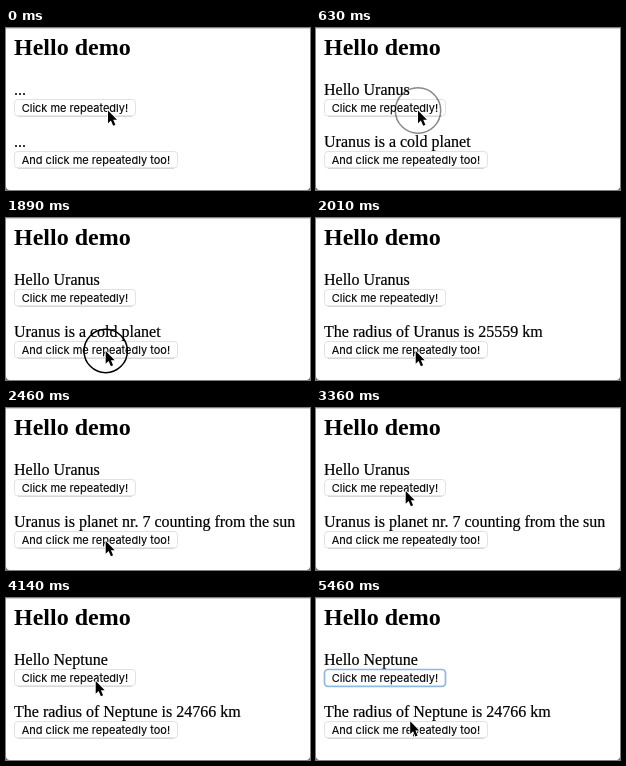
Recreate the animation shown at these times as an HTML page. Size 304x162 px, loop 5580 ms.

```html
<!DOCTYPE html>
<html lang="en">
<head>
<meta charset="utf-8">
<title>Hello demo</title>
<style>
  html, body { margin: 0; width: 100%; height: 100%; overflow: hidden; background: #fff; }
  svg { display: block; width: 100vw; height: 100vh; }
  text { fill: #000; white-space: pre; }
  .serif { font: 16px "Liberation Serif", serif; stroke: #000; stroke-width: .2px; }
  .title { font: bold 24px "Liberation Serif", serif; }
  .label { font: 11px Inter, sans-serif; stroke: #000; stroke-width: .12px; }
  .button { fill: #fff; stroke: #e2e2e2; }
  .shade { stroke: #c6c6c6; stroke-width: .8px; }
</style>
</head>
<body>
<svg viewBox="0 0 304 162" preserveAspectRatio="none">
  <rect width="304" height="162" fill="#fff"/>
  <path d="M0 .5H304" stroke="#d4d4d4"/>
  <path d="M0 159V162H3Q.5 161.500 0 159ZM304 159V162H301Q303.500 161.500 304 159Z" fill="#707070"/>
  <text class="title" x="8" y="27">Hello demo</text>
  <text class="serif" id="greeting" x="8" y="67"></text>
  <text class="serif" id="fact" x="8" y="119"></text>

  <rect class="button" x="8.500" y="71.500" width="121" height="16.500" rx="3.500"/>
  <path class="shade" d="M12 88.200H126"/>
  <rect id="focus" x="8.500" y="71.500" width="121" height="17" rx="3.500" fill="none" stroke="#8db9e4" stroke-width="1.700"/>
  <text class="label" x="15.700" y="84">Click me repeatedly!</text>

  <rect class="button" x="8.500" y="123.500" width="163" height="16.500" rx="3.500"/>
  <path class="shade" d="M12 140.200H168"/>
  <text class="label" x="15.700" y="136">And click me repeatedly too!</text>

  <circle id="ring" fill="none" stroke="#000" stroke-width="1.500"/>
  <path id="pointer" d="M0 0V12.700L2.900 10 5.200 15.300 7.400 14.300 5.200 9.300H9Z"
        stroke="#fff" stroke-width="1.600" stroke-linejoin="round" paint-order="stroke"/>
</svg>
<script>
const LOOP = 5580, STEP = 30;
const $ = id => document.getElementById(id);
const greeting = $("greeting"), fact = $("fact"), focus = $("focus");
const ring = $("ring"), pointer = $("pointer");

// time, greeting, fact
const lines = [
  [0, "...", "..."],
  [570, "Hello Uranus", "Uranus is a cold planet"],
  [1950, "Hello Uranus", "The radius of Uranus is 25559 km"],
  [2430, "Hello Uranus", "Uranus is planet nr. 7 counting from the sun"],
  [3510, "Hello Neptune", "Neptune is a cold planet"],
  [4110, "Hello Neptune", "The radius of Neptune is 24766 km"]
];

// time, x, y of the pointer tip
const path = [
  [0, 102, 82.5], [1320, 102, 82.5], [1620, 102, 144], [1800, 99.7, 133],
  [2910, 99.7, 133], [3090, 89.7, 88], [3210, 89.7, 88], [3360, 89.7, 83],
  [4620, 89.7, 83], [4800, 94.2, 123.3], [LOOP, 94.2, 123.3]
];

// ring appears, ring is gone
const clicks = [[450, 660], [1860, 2010], [2370, 2460], [3450, 3540], [4020, 4140]];

const ease = p => p * p * (3 - 2 * p);

function tipAt(t) {
  const i = path.findIndex(k => k[0] > t);
  const [t0, x0, y0] = path[i - 1], [t1, x1, y1] = path[i];
  const p = ease((t - t0) / (t1 - t0));
  return [x0 + (x1 - x0) * p, y0 + (y1 - y0) * p];
}

function draw(t) {
  const [, hello, info] = lines.filter(l => l[0] <= t).pop();
  if (greeting.textContent !== hello) greeting.textContent = hello;
  if (fact.textContent !== info) fact.textContent = info;

  const [x, y] = tipAt(t);
  pointer.setAttribute("transform", `translate(${x} ${y})`);

  const click = clicks.find(([a, b]) => t >= a && t < b);
  ring.style.display = click ? "" : "none";
  if (click) {
    const fade = Math.max(0, 1 - (click[1] - t) / 90);
    ring.setAttribute("cx", x);
    ring.setAttribute("cy", y);
    ring.setAttribute("r", 21.7 + 1.5 * fade);
    ring.setAttribute("opacity", 1 - 0.8 * fade);
  }
  focus.style.display = t >= 5460 ? "" : "none";
}

const start = performance.now();
function tick(now) {
  const t = Math.max(0, now - start) % LOOP;
  draw(Math.floor(t / STEP) * STEP);
  requestAnimationFrame(tick);
}
draw(0);
requestAnimationFrame(tick);
</script>
</body>
</html>
```
